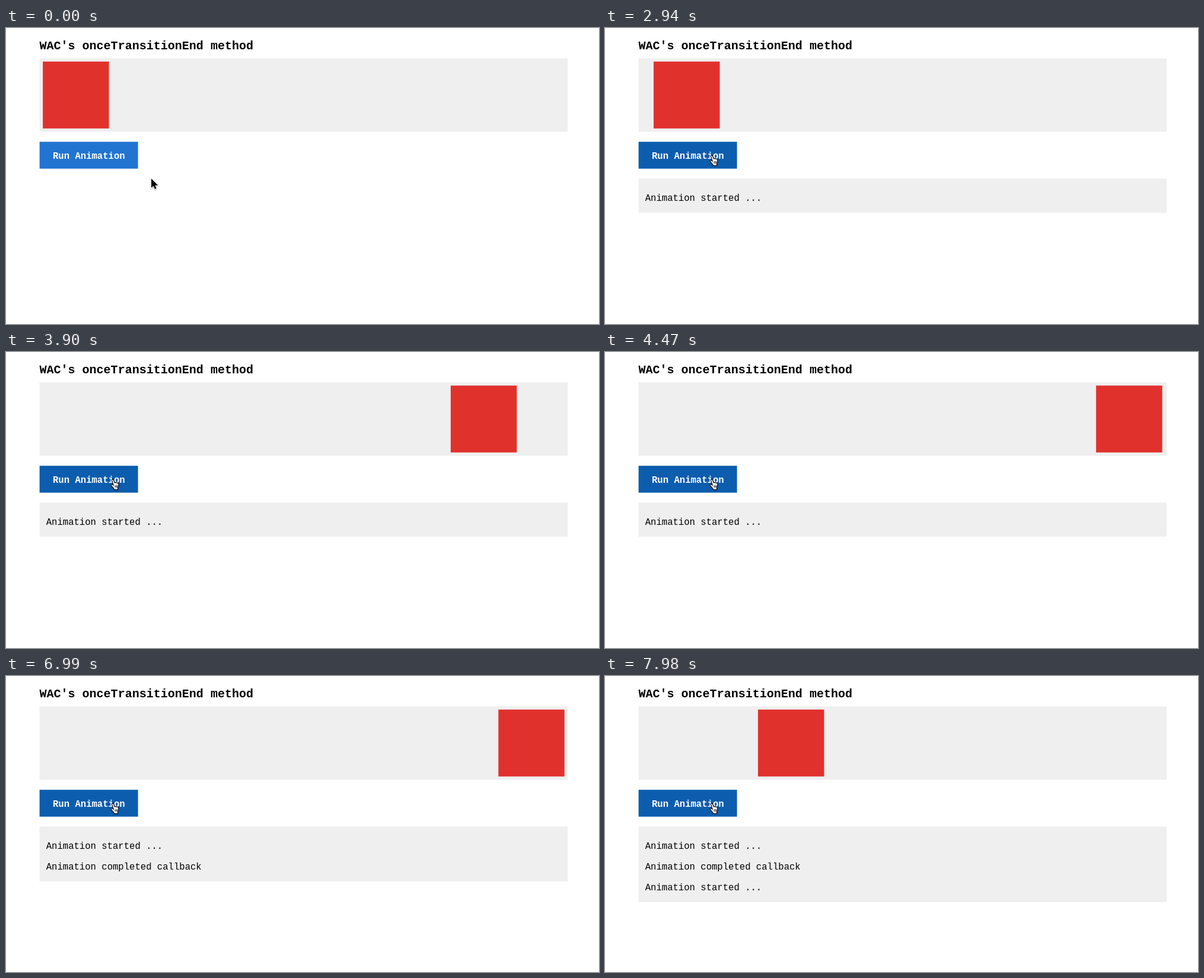
An HTML page with a canvas for the animation above (8000 ms loop, 1000 px wide and 500 px high).

```html
<!DOCTYPE html>
<html lang="en">
<head>
<meta charset="utf-8">
<title>onceTransitionEnd</title>
<style>
  html, body { margin: 0; width: 100%; height: 100%; overflow: hidden; background: #fff; }
  canvas { display: block; }
</style>
</head>
<body>
<canvas id="stage" width="1000" height="500"></canvas>
<script>
const ctx = document.getElementById('stage').getContext('2d');
const LOOP = 8000, STEP = 30;
const LEFT = 56.6, WIDTH = 890.6;
const BOX = { from: 62.1, to: 830.3, y: 56.7, w: 111.5, h: 113 };
const BUTTON = { x: LEFT, y: 192.2, w: 166, h: 45.4 };
const FONT = '"Courier New", Courier, "Liberation Mono", monospace';
const GREY = '#efefef';

const RUN = 1860, FORWARD = 2746, BACK = 7101;
const MOVE = { start: 585, length: 430, from: [245, 254.5], to: [179.3, 214.8] };
const HOVER = { start: 810, length: 200 };
const LOG = [
  { at: 2730, text: 'Animation started ...' },
  { at: 4605, text: 'Animation completed callback' },
  { at: 7080, text: 'Animation started ...' }
];

const arrow = new Path2D('M0 0 V15.6 L3.6 12.2 L6 17.6 L8.7 16.4 L6.4 11.2 H11.4 Z');
const hand = new Path2D('M2.1 2.3 C1.4 .6 3.9 -.4 4.7 1.3 L6.8 6.5 ' +
  'C7 5.3 8.6 5.4 8.9 6.6 C9.3 5.7 10.8 5.9 11.1 7.1 C11.7 6.4 13.1 6.8 13.2 8.2 ' +
  'C13.6 10.6 13.1 13 12 15 L11.9 18 H6.2 L5.7 16.4 C4 14.6 2.3 12.6 .8 10.9 ' +
  'C.1 9.4 1.8 8.5 3.1 9.5 L4.8 10.7 Z');
const creases = new Path2D('M7.5 10.6 V14.4 M9.4 10.6 V14.4 M11.2 10.6 V14.4');

const clamp = v => Math.max(0, Math.min(1, v));
const progress = (t, start, length) => clamp((t - start) / length);
const mix = (a, b, p) => a + (b - a) * p;
const smooth = p => p * p * (3 - 2 * p);

// cubic-bezier(.42, 0, .18, 1)
function ease(x) {
  let lo = 0, hi = 1, s = x;
  for (let i = 0; i < 24; i++) {
    s = (lo + hi) / 2;
    const r = 1 - s;
    if (1.26 * r * r * s + 0.54 * r * s * s + s * s * s < x) lo = s;
    else hi = s;
  }
  return smooth(s);
}

function rect(color, x, y, w, h) {
  ctx.fillStyle = color;
  ctx.fillRect(x, y, w, h);
}

function text(str, x, y, size, color = '#000', weight = 'normal') {
  ctx.font = `${weight} ${size}px ${FONT}`;
  ctx.fillStyle = color;
  ctx.fillText(str, x, y);
}

function drawButton(t) {
  const p = progress(t, HOVER.start, HOVER.length);
  const rgb = [[33, 12], [117, 93], [208, 174]].map(([a, b]) => Math.round(mix(a, b, p)));
  rect(`rgb(${rgb})`, BUTTON.x, BUTTON.y, BUTTON.w, BUTTON.h);
  text('Run Animation', 79, 221, 15.6, '#fff', 'bold');
}

function drawLog(t) {
  const lines = LOG.filter(line => t >= line.at);
  if (!lines.length) return;
  rect(GREY, LEFT, 254.3, WIDTH, 22.7 + 35 * lines.length);
  lines.forEach((line, i) => text(line.text, 67.7, 292 + 35 * i, 15.6));
}

function drawCursor(t) {
  const p = smooth(progress(t, MOVE.start, MOVE.length));
  const [x, y] = MOVE.from.map((v, i) => mix(v, MOVE.to[i], p));
  const over = x < BUTTON.x + BUTTON.w && y < BUTTON.y + BUTTON.h;
  ctx.save();
  ctx.lineJoin = 'round';
  ctx.shadowColor = 'rgba(0,0,0,.35)';
  ctx.shadowBlur = 3;
  ctx.shadowOffsetY = 1;
  if (over) {
    ctx.translate(x - 2.8, y - 0.3);
    ctx.fillStyle = '#fff';
    ctx.fill(hand);
    ctx.shadowColor = 'transparent';
    ctx.strokeStyle = '#000';
    ctx.lineWidth = 1.1;
    ctx.stroke(hand);
    ctx.lineWidth = 0.9;
    ctx.stroke(creases);
  } else {
    ctx.translate(x, y);
    ctx.strokeStyle = '#fff';
    ctx.lineWidth = 1.8;
    ctx.stroke(arrow);
    ctx.shadowColor = 'transparent';
    ctx.fillStyle = '#000';
    ctx.fill(arrow);
  }
  ctx.restore();
}

function draw(t) {
  rect('#fff', 0, 0, 1000, 500);
  text("WAC's onceTransitionEnd method", 56.4, 36, 20.04, '#000', 'bold');
  rect(GREY, LEFT, 51.2, WIDTH, 124.2);
  const p = ease(progress(t, FORWARD, RUN)) - ease(progress(t, BACK, RUN));
  rect('#e1312d', mix(BOX.from, BOX.to, p), BOX.y, BOX.w, BOX.h);
  drawButton(t);
  drawLog(t);
  drawCursor(t);
}

const origin = performance.now();
function tick() {
  const t = (performance.now() - origin) % LOOP;
  draw(Math.floor(t / STEP) * STEP);
  requestAnimationFrame(tick);
}
tick();
</script>
</body>
</html>
```
